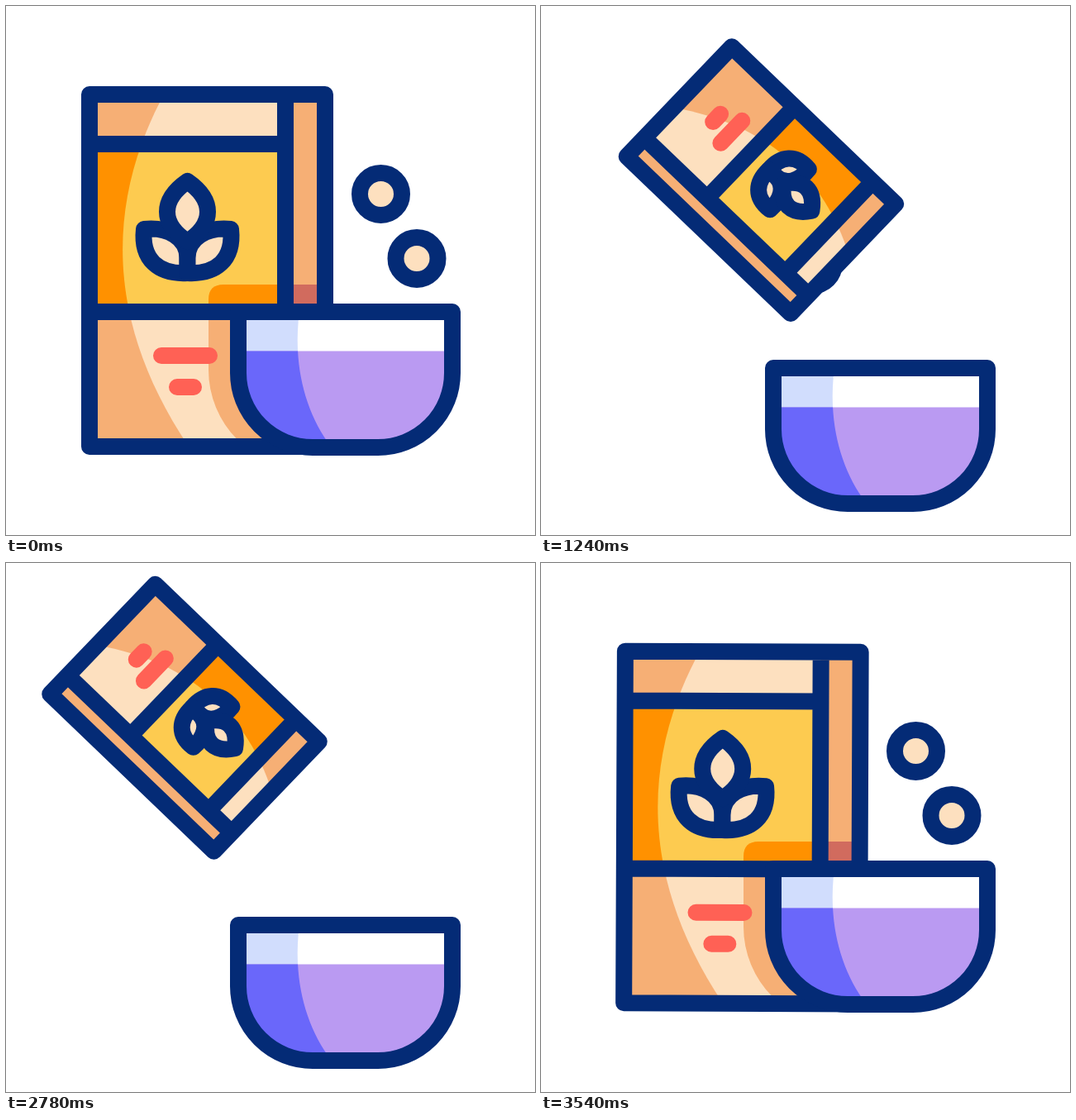
An HTML page with a canvas for the animation above (3.6 s loop, 640 px wide and 640 px high).

```html
<!DOCTYPE html>
<html lang="en">
<head>
<meta charset="utf-8">
<title>Cereal pour</title>
<style>
html, body { margin: 0; height: 100%; overflow: hidden; background: #fff; }
canvas { display: block; width: 100vmin; height: 100vmin; }
</style>
</head>
<body>
<canvas id="stage" width="640" height="640"></canvas>
<script>
const ctx = document.getElementById('stage').getContext('2d');
const LOOP = 3600, STROKE = 20, BALL_RADIUS = 25.5;
const NAVY = '#042b76', TAN = '#f6af75', CREAM = '#fde0bf', ORANGE = '#ff9100',
      YELLOW = '#fdcb50', RED = '#ff6155', BRICK = '#d16b5e', WHITE = '#fff',
      LILAC = '#ba9af2', VIOLET = '#6a67fa', ICE = '#d1ddfd';

const shape = d => new Path2D(d);
const rect = (x0, y0, x1, y1) => shape(`M${x0} ${y0}H${x1}V${y1}H${x0}Z`);

// box: left, front edge, right, top, bottom, and the label between
const [L, F, R, T, B, LABEL_T, LABEL_B] = [101, 338, 386, 107, 533, 167, 370];
const PIVOT_X = 193.5, PIVOT_Y = 260;
const face = rect(L, T, F, B);
const label = rect(L, LABEL_T, F, LABEL_B);
const side = rect(F, T, R, B);
const frame = shape(`M${L} ${T}H${R}V${B}H${L}ZM${F} ${T}V${B}M${L} ${LABEL_T}H${F}M${L} ${LABEL_B}H${F}`);
const shine = shape(`M191 ${T}C122 235 118 380 221 ${B}H500V${T}Z`);
const bars = shape('M188 423H246M207 461H227');

const sideLeaf = shape('M167 270C195 267 219.5 280 219.5 305V323C185 325 163 307 167 270Z');
const topLeaf = shape('M219.5 212Q195 229 195 249T219.5 285Q244 269 244 249T219.5 212Z');
const mirrored = new Path2D();
mirrored.addPath(sideLeaf, new DOMMatrix([-1, 0, 0, 1, 439, 0]));
const leaves = [sideLeaf, mirrored, topLeaf];

const bowl = shape('M281 370H540V444A90 90 0 0 1 450 534H371A90 90 0 0 1 281 444Z');
const bowlShine = shape('M355 370C347 430 360 490 394 534H281V370Z');
const liquid = rect(281, 417.5, 540, 534);
const shadow = shape('M263 337H524V560H365A120 120 0 0 1 245 440V355Q245 337 263 337Z');

// eased 0 to 1 between two times
function ramp(t, from, to) {
  const x = Math.min(1, Math.max(0, (t - from) / (to - from)));
  return x * x * (3 - 2 * x);
}
// goes out during a..b and comes back during c..d
const trip = (t, a, b, c, d) => ramp(t, a, b) - ramp(t, c, d);
const mix = (a, b, k) => a + (b - a) * k;

function fill(path, color, m) {
  ctx.setTransform(m);
  ctx.fillStyle = color;
  ctx.fill(path);
}

// outlines keep their width whatever the scale
function outline(path, color, m) {
  const placed = new Path2D();
  placed.addPath(path, m);
  ctx.resetTransform();
  ctx.strokeStyle = color;
  ctx.stroke(placed);
}

function clipped(clip, m, paint) {
  ctx.save();
  ctx.setTransform(m);
  ctx.clip(clip);
  paint();
  ctx.restore();
}

function drawBall(x, y) {
  ctx.resetTransform();
  ctx.beginPath();
  ctx.arc(x, y, BALL_RADIUS, 0, 7);
  ctx.fillStyle = CREAM;
  ctx.fill();
  ctx.strokeStyle = NAVY;
  ctx.stroke();
}

// all balls end up hidden behind the bowl
function drawBalls(t) {
  const sink = trip(t, 0, 560, 3100, 3540);
  for (const i of [0, 1]) {
    drawBall(mix(453.5 + 43.5 * i, 475.5 - 42.5 * i, sink), mix(227.5 + 78 * i, 476 + 34 * i, sink));
    const start = 1230 + 640 * i;
    const drop = ramp(t, start, start + 540 + 60 * i);
    if (drop) drawBall(mix(329 + 12 * i, 414, drop), mix(312.5, 503, drop));
  }
}

function drawBox(t, bowlM) {
  const lift = trip(t, 0, 400, 3000, 3560);
  const tip = trip(t, 400, 600, 2800, 3000);
  const reach = trip(t, 600, 1040, 2480, 2800);
  const scale = 1 - .225 * lift - .13 * tip;
  const m = new DOMMatrix()
    .translate(PIVOT_X + 50.4 * lift + 21.8 * tip + 51 * reach,
               PIVOT_Y - 25.6 * lift - 43.9 * tip + 23.7 * reach)
    .rotate(63 * lift + 70.8 * tip)
    .scale(scale)
    .translate(-PIVOT_X, -PIVOT_Y);
  const shineM = m.translate(108 * (1 - scale), 0);

  const paint = (area, base, light, shade) => {
    fill(area, base, m);
    clipped(area, m, () => {
      fill(shine, light, shineM);
      fill(shadow, shade, bowlM);
    });
  };
  paint(face, TAN, CREAM, TAN);
  paint(label, ORANGE, YELLOW, ORANGE);
  paint(side, TAN, TAN, BRICK);
  outline(frame, NAVY, m);
  outline(bars, RED, m);
  for (const leaf of leaves) {
    fill(leaf, CREAM, m);
    outline(leaf, NAVY, m);
  }
}

function drawBowl(m) {
  fill(bowl, WHITE, m);
  clipped(bowl, m, () => {
    fill(bowlShine, ICE, m);
    fill(liquid, LILAC, m);
    clipped(liquid, m, () => fill(bowlShine, VIOLET, m));
  });
  outline(bowl, NAVY, m);
}

function draw(now) {
  const t = now % LOOP;
  const bowlM = new DOMMatrix().translate(0, 68 * trip(t, 0, 400, 3000, 3410));
  ctx.resetTransform();
  ctx.fillStyle = WHITE;
  ctx.fillRect(0, 0, 640, 640);
  ctx.lineWidth = STROKE;
  ctx.lineJoin = ctx.lineCap = 'round';
  drawBalls(t);
  drawBox(t, bowlM);
  drawBowl(bowlM);
}

let start;
function tick(now) {
  start ??= now;
  draw(now - start);
  requestAnimationFrame(tick);
}
draw(0);
requestAnimationFrame(tick);
</script>
</body>
</html>
```
